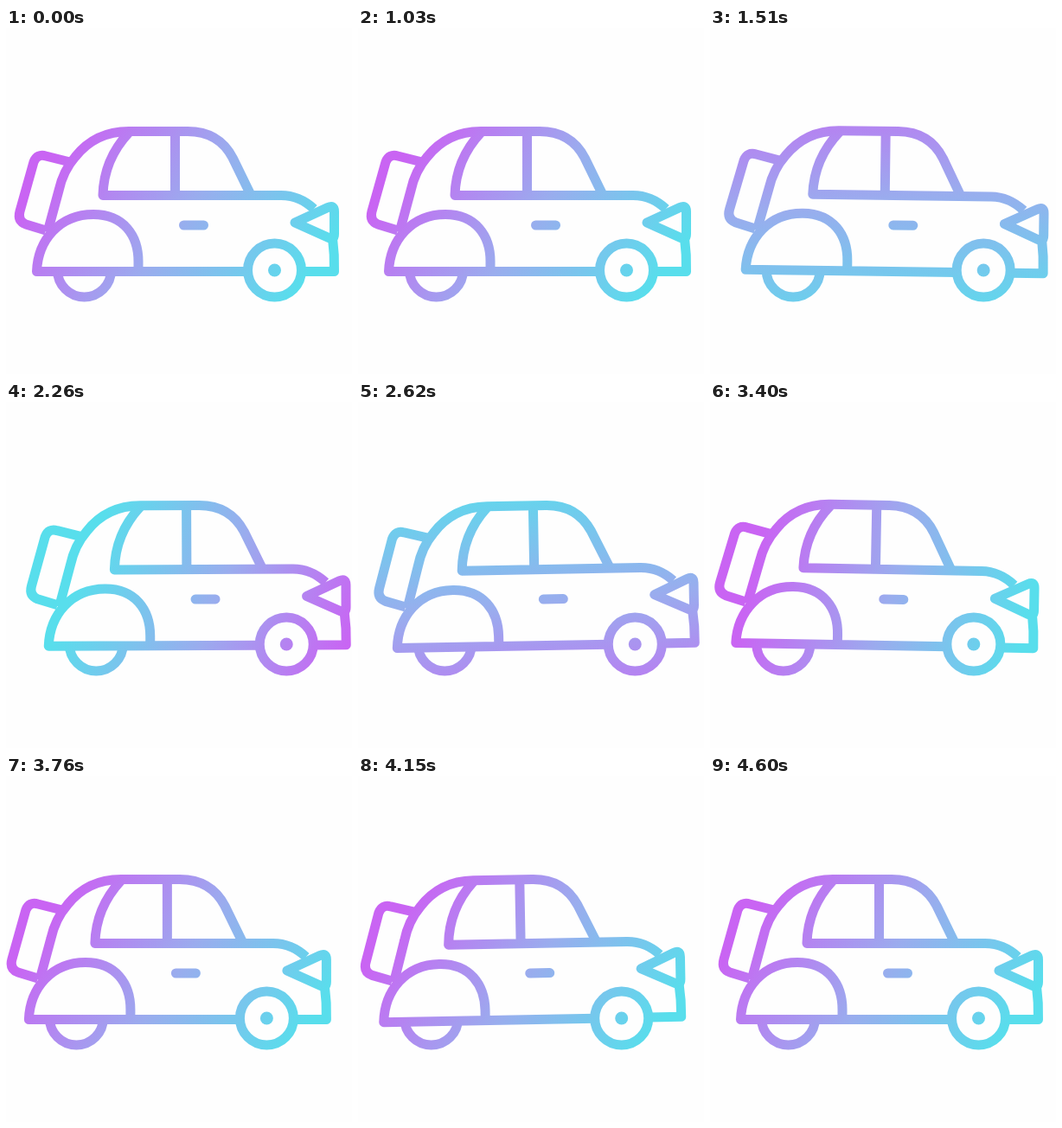
Recreate the animation shown at these times as an HTML page. Size 400 px wide and 400 px high, loop 4630 ms.

```html
<!DOCTYPE html>
<html lang="en">
<head>
<meta charset="utf-8">
<title>Car</title>
<style>
  html, body { margin: 0; width: 100%; height: 100%; overflow: hidden; background: #fefefe; }
  svg { display: block; width: 100vw; height: 100vh; }
</style>
</head>
<body>
<svg viewBox="0 0 400 400">
  <defs>
    <linearGradient id="paint" gradientUnits="userSpaceOnUse">
      <stop offset="0" stop-color="#c964f3"/>
      <stop offset=".5" stop-color="#9aacee"/>
      <stop offset="1" stop-color="#58deec"/>
    </linearGradient>
    <mask id="car" maskUnits="userSpaceOnUse" x="0" y="0" width="400" height="400">
      <g id="drive" fill="none" stroke="#fff" stroke-width="11" stroke-linejoin="round">
        <g id="body">
          <!-- spare wheel -->
          <path d="M74 155L46 148Q36 145 32 155L16 212Q13 223 23 227L46 234"/>
          <!-- roof and windows -->
          <path d="M48 236L61 188Q66 165 80 149C95 130 115 119.5 142 119.5H210C235 119.5 252 131 262 150L282 191"/>
          <path d="M142 121Q113 152 112 193.5H318C335 193.5 346 200 356 209M195.5 119.5V193.5"/>
          <!-- headlight and nose -->
          <path d="M334 225L372 207.5Q379.500 204 379.5 212V238Q379.5 245.5 373 242.5Z"/>
          <path d="M377.5 243Q380 262 379.5 281.5H342"/>
          <!-- fender, sill and handle -->
          <path d="M280 281.5H35.5C37 245 62 215.5 101 215.5C136 215.5 153 240 153 270V281.5"/>
          <path d="M205.5 228H228.5" stroke-linecap="round"/>
        </g>
        <!-- wheels -->
        <path d="M59.5 280A31 31 0 0 0 121.5 280"/>
        <circle cx="310.5" cy="280" r="31"/>
        <circle cx="310.5" cy="280" r="7.5" fill="#fff" stroke="none"/>
      </g>
    </mask>
  </defs>
  <rect width="400" height="400" fill="url(#paint)" mask="url(#car)"/>
</svg>
<script>
  const LOOP = 4630, START = 1010, END = 4600;
  const [paint, drive, body] = ['paint', 'drive', 'body'].map(id => document.getElementById(id));

  const clamp = p => Math.min(1, Math.max(0, p));
  const sine = p => (1 - Math.cos(Math.PI * p)) / 2;

  // Eased move between two times, from 0 to 1
  const ease = (t, from, to) => sine(clamp((t - from) / (to - from)));

  // Forward, back past the start, then home
  function shift(t) {
    const far = 14, back = -9.2, turn = 2150, rest = 3830;
    return far * ease(t, START, turn)
      + (back - far) * ease(t, turn, rest)
      - back * ease(t, rest, END);
  }

  // Rocks nose down and nose up at an even beat
  function tilt(t) {
    const size = 1.05, first = 1815, beat = 778, last = first + 3 * beat;
    if (t < first) return size * ease(t, START, first);
    if (t > last) return size * (ease(t, last, END) - 1);
    return size * Math.cos(Math.PI * (t - first) / beat);
  }

  // One full turn, half steady and half eased
  function turnAngle(t) {
    const p = clamp((t - START) / 2640);
    return (34 + 180 * (p + sine(p))) * Math.PI / 180;
  }

  function draw(t) {
    drive.setAttribute('transform', `translate(${shift(t)} 0)`);
    body.setAttribute('transform', `rotate(${tilt(t)} 207 280)`);

    const angle = turnAngle(t);
    const place = (n, r) => {
      paint.setAttribute('x' + n, 230 + r * Math.cos(angle));
      paint.setAttribute('y' + n, 214 + r * Math.sin(angle));
    };
    place(1, -180);
    place(2, 140);
  }

  const begin = performance.now();
  function tick() {
    draw((performance.now() - begin) % LOOP);
    requestAnimationFrame(tick);
  }
  tick();
</script>
</body>
</html>
```
